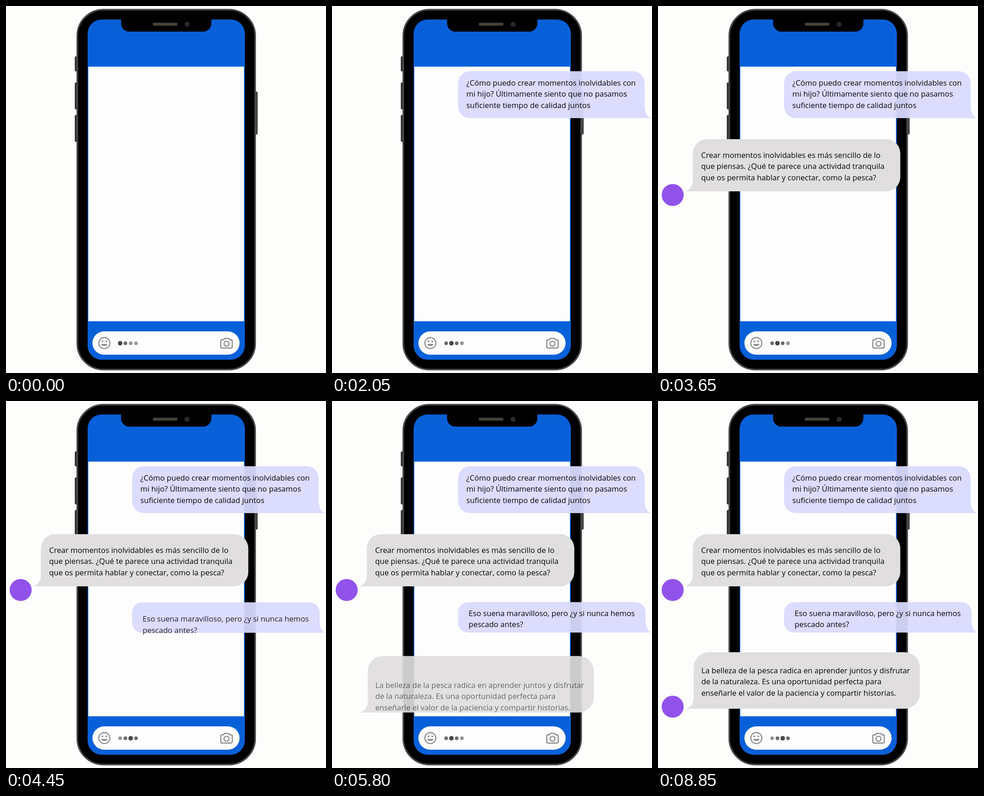
Recreate the animation shown at these times as an HTML page. Size 698 px wide and 802 px high, loop 9 s.

```html
<!DOCTYPE html>
<html lang="es">
<head>
<meta charset="utf-8">
<title>Chat</title>
<style>
  html, body { margin: 0; width: 698px; height: 802px; overflow: hidden; background: #fdfdfc; }
  svg { display: block; }
  text { font: 16.65px "Open Sans", sans-serif; fill: #060608; }
</style>
</head>
<body>
<svg id="stage" width="698" height="802" viewBox="0 0 698 802">
  <g fill="#36363a">
    <rect x="150" y="110" width="10" height="33" rx="3"/>
    <rect x="150" y="167" width="10" height="59" rx="3"/>
    <rect x="150" y="238" width="10" height="59" rx="3"/>
    <rect x="538" y="187" width="11" height="94" rx="3" fill="#45453f"/>
  </g>
  <rect x="155.500" y="8" width="388" height="786.500" rx="57" fill="#000" stroke="#47474c" stroke-width="3.400"/>
  <rect x="178" y="29.500" width="343" height="743.500" rx="31" fill="#0860d9"/>
  <rect x="179.500" y="132.500" width="339.500" height="556.500" fill="#fdfdfd"/>
  <path d="M251 29H448V38A18 18 0 0 1 430 56H269A18 18 0 0 1 251 38Z"/>
  <rect x="320" y="36.500" width="54" height="6.500" rx="3.200" fill="#42423a"/>
  <circle cx="395" cy="40" r="5.500" fill="#29292d"/>
  <rect x="188.500" y="711" width="321" height="51" rx="25.500" fill="#fdfdfd"/>
  <g fill="none" stroke="#8c8c8c" stroke-width="2.400">
    <circle cx="214.500" cy="736.500" r="12"/>
    <path d="M471 729.500H474L476.500 726.500H485.500L488 729.500H491A2.500 2.500 0 0 1 493.500 732V745A2.500 2.500 0 0 1 491 747.500H471A2.500 2.500 0 0 1 468.500 745V732A2.500 2.500 0 0 1 471 729.500Z"/>
    <circle cx="481" cy="738" r="5.400"/>
  </g>
  <g fill="#8c8c8c">
    <circle cx="210.300" cy="733" r="1.900"/>
    <circle cx="218.700" cy="733" r="1.900"/>
    <path d="M207.500 738.500H221.500A7.200 6 0 0 1 207.500 738.500Z"/>
  </g>
</svg>
<script>
const LOOP = 9000, RISE = 800, LAG = 285, SHIFT = 62;
const stage = document.getElementById('stage');
const parts = [];

function add(parent, tag, attrs) {
  const el = document.createElementNS('http://www.w3.org/2000/svg', tag);
  for (const key in attrs) el.setAttribute(key, attrs[key]);
  return parent.appendChild(el);
}

// A part fades in while moving by (dx, dy) into its resting place.
function enter(el, start, dx, dy) {
  parts.push({ el, start, dx, dy });
}

// Rounded bubble with a tail at the lower right, or mirrored to the lower left.
function bubble({ left, right, top, bottom, r, tail, mine }) {
  const g = add(stage, 'g', {});
  const d = `M${left + r} ${top}H${right - r}A${r} ${r} 0 0 1 ${right} ${top + r}` +
    `V${bottom - 27}C${right} ${bottom - 13} ${right + 4} ${bottom - 4} ${right + tail} ${bottom}` +
    `H${left + r}A${r} ${r} 0 0 1 ${left} ${bottom - r}V${top + r}A${r} ${r} 0 0 1 ${left + r} ${top}Z`;
  add(g, 'path', {
    d,
    fill: mine ? '#dadaff' : '#e0dede',
    'fill-opacity': mine ? 0.94 : 1,
    transform: mine ? '' : `translate(${left + right}) scale(-1 1)`
  });
  return g;
}

function lines(x, y, rows) {
  const g = add(stage, 'g', {});
  rows.forEach((row, i) => add(g, 'text', { x, y: y + i * 24.4 }).textContent = row);
  return g;
}

const messages = [
  { start: 800, mine: true, left: 275, right: 682, top: 142.5, bottom: 245, r: 26, tail: 14, x: 293, y: 174,
    rows: ['¿Cómo puedo crear momentos inolvidables con', 'mi hijo? Últimamente siento que no pasamos',
      'suficiente tiempo de calidad juntos'] },
  { start: 2205, left: 76, right: 528.5, top: 291, bottom: 405, r: 31, tail: 17, x: 94, y: 332,
    rows: ['Crear momentos inolvidables es más sencillo de lo', 'que piensas. ¿Qué te parece una actividad tranquila',
      'que os permita hablar y conectar, como la pesca?'], avatar: 413 },
  { start: 3720, mine: true, left: 275, right: 684, top: 439.5, bottom: 506, r: 22, tail: 12, x: 298, y: 470,
    rows: ['Eso suena maravilloso, pero ¿y si nunca hemos', 'pescado antes?'] },
  { start: 5290, left: 78, right: 571, top: 549, bottom: 672.5, r: 33, tail: 18, x: 94.5, y: 595,
    rows: ['La belleza de la pesca radica en aprender juntos y disfrutar', 'de la naturaleza. Es una oportunidad perfecta para',
      'enseñarle el valor de la paciencia y compartir historias.'], avatar: 668 }
];

for (const m of messages) {
  enter(bubble(m), m.start, 0, SHIFT);
  enter(lines(m.x, m.y, m.rows), m.start + LAG, 0, SHIFT);
  if (m.avatar) {
    const circle = add(stage, 'circle', { cx: 32, cy: m.avatar, r: 24, fill: '#9152ec' });
    enter(circle, m.start + 2 * LAG, -SHIFT, 0);
  }
}

const greys = ['#484848', '#686868', '#929292', '#9a9a9a'];
const dots = [249, 260.5, 272, 283.5].map(cx => add(stage, 'circle', { cx, cy: 737 }));

function draw(t) {
  for (const { el, start, dx, dy } of parts) {
    const p = Math.min(1, Math.max(0, (t - start) / RISE));
    const rest = (1 - p) ** 2;
    el.setAttribute('opacity', 1 - rest ** 1.2);
    el.setAttribute('transform', `translate(${dx * rest} ${dy * rest})`);
  }
  const step = Math.max(-1, Math.floor((t - 440) / 247));
  const active = (step + 4) % 3;
  dots.forEach((dot, i) => {
    const away = Math.abs(i - active);
    dot.setAttribute('r', away ? 3.9 : 5);
    dot.setAttribute('fill', greys[away]);
  });
}

const origin = performance.now();
function tick() {
  const t = (performance.now() - origin) % LOOP;
  draw(Math.floor(t / 50) * 50);
  requestAnimationFrame(tick);
}
tick();
</script>
</body>
</html>
```
